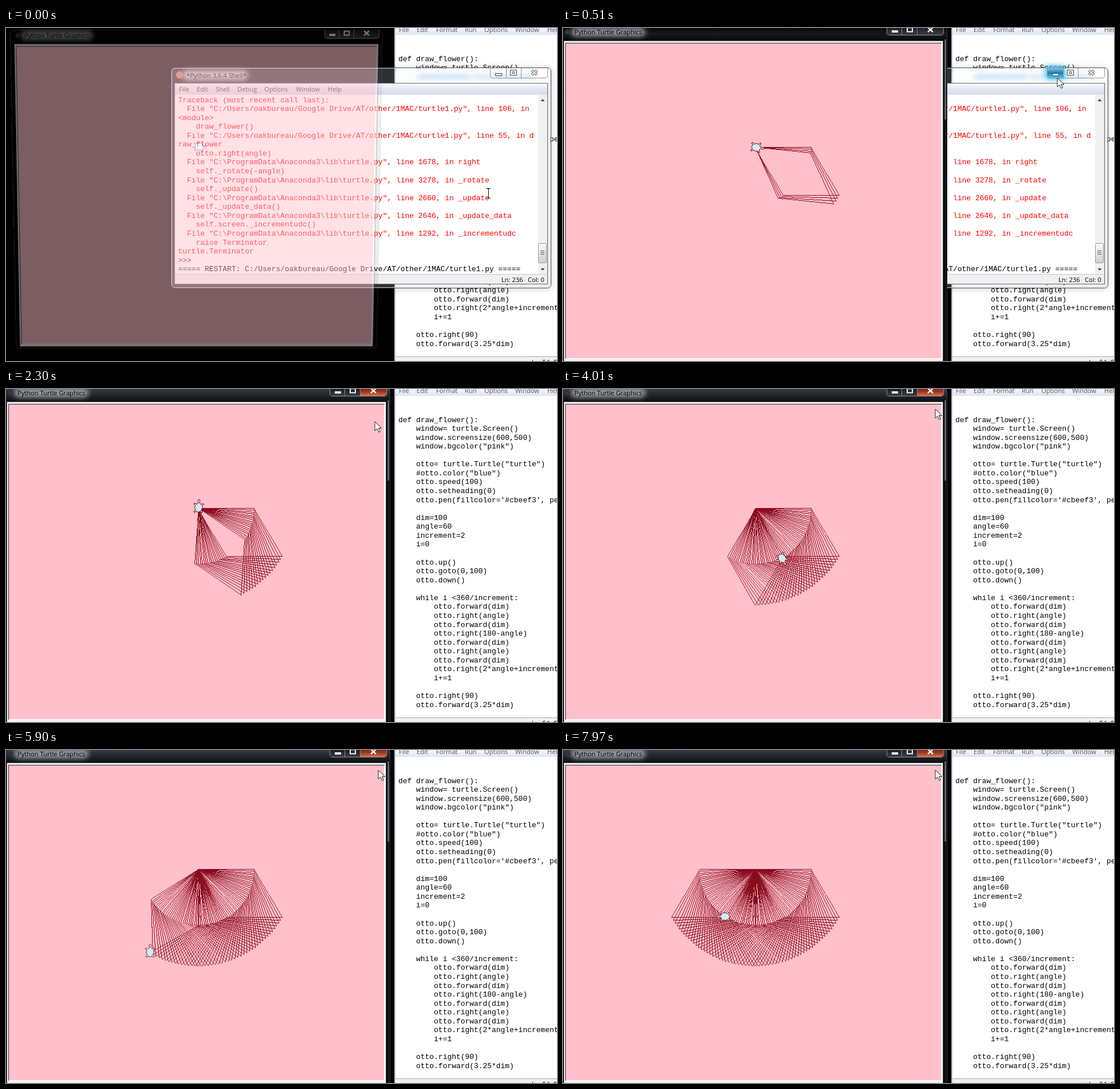
These frames come from a looping animation (962x582 px, 8000 ms). An HTML page:

```html
<!DOCTYPE html>
<html lang="en">
<head>
<meta charset="utf-8">
<title>Turtle flower</title>
<style>
html, body { margin: 0; width: 100%; height: 100%; overflow: hidden; background: #000; }
#stage { position: relative; width: 962px; height: 582px; overflow: hidden; background: #000; }
svg { position: absolute; left: 0; top: 0; width: 962px; height: 582px; overflow: visible; }
text { white-space: pre; }
.ui { font: 11.15px "Open Sans", "Noto Sans", sans-serif; }
.mono { font: 12.95px "Liberation Mono", "DejaVu Sans Mono", monospace; }
#turtleWin { transform-origin: 332px 302px; z-index: 2; }
#shellWin { transform-origin: 620px 262px; z-index: 1; }
#pointer { z-index: 5; }
.soft { filter: blur(4px); }
.shade { filter: drop-shadow(0 1px 4px rgba(0,0,0,.9)); }
.crisp { shape-rendering: crispEdges; }
</style>
</head>
<body>
<div id="stage">
  <svg id="codeWin"></svg>
  <svg id="shellWin"></svg>
  <svg id="turtleWin"></svg>
  <svg id="pointer">
    <path id="arrow" d="M0 0V16L3.8 12.5 6.8 18.5 9.3 17.4 6.4 11.5H11.7Z" fill="#fff" stroke="#222"/>
    <path id="beam" class="crisp" d="M-3.5-8.5H-1L0-7.5 1-8.5H3.5M0-8V8M-3.5 8.5H-1L0 7.5 1 8.5H3.5" fill="none" stroke="#111"/>
  </svg>
</div>
<script>
const LOOP = 8000, LINE = 15.57;
const $ = id => document.getElementById(id);
const clamp = v => Math.max(0, Math.min(1, v));
const esc = s => s.replace(/&/g, '&amp;').replace(/</g, '&lt;');
const rect = (x, y, w, h, fill, more = '') =>
  `<rect x="${x}" y="${y}" width="${w}" height="${h}" fill="${fill}" ${more}/>`;
const text = (x, y, s, cls = 'ui', fill = '#000') =>
  `<text x="${x}" y="${y}" class="${cls}" fill="${fill}">${esc(s)}</text>`;
const path = (d, stroke, more = '') => `<path d="${d}" fill="none" stroke="${stroke}" ${more}/>`;
const grad = (id, ...stops) => `<linearGradient id="${id}" x2="0" y2="1">` +
  stops.map((c, i) => `<stop offset="${i / (stops.length - 1)}" stop-color="${c}"/>`).join('') +
  '</linearGradient>';
const menu = (xs, y, fill) => ['File', 'Edit', 'Format', 'Shell', 'Debug', 'Run', 'Options', 'Window', 'Help']
  .map(s => s in xs ? text(xs[s], y, s, 'ui', fill) : '').join('');

// Editor
const code = `def draw_flower():
    window= turtle.Screen()
    window.screensize(600,500)
    window.bgcolor("pink")

    otto= turtle.Turtle("turtle")
    #otto.color("blue")
    otto.speed(100)
    otto.setheading(0)
    otto.pen(fillcolor='#cbeef3', pencolor

    dim=100
    angle=60
    increment=2
    i=0

    otto.up()
    otto.goto(0,100)
    otto.down()

    while i <360/increment:
        otto.forward(dim)
        otto.right(angle)
        otto.forward(dim)
        otto.right(180-angle)
        otto.forward(dim)
        otto.right(angle)
        otto.forward(dim)
        otto.right(2*angle+increment)
        i+=1

    otto.right(90)
    otto.forward(3.25*dim)`.split('\n');

$('codeWin').innerHTML = `<defs>${grad('bar', '#f4f6fb', '#dfe4f1')}</defs>` +
  rect(678, 0, 284, 582, '#b9bec6') + rect(680, 0, 282, 582, '#fff') + rect(680, 0, 282, 12, 'url(#bar)') +
  menu({ File: 686, Edit: 717, Format: 751, Run: 801, Options: 835, Window: 889, Help: 945 }, 7, '#555') +
  code.map((s, i) => text(685, 57.5 + i * LINE, s, 'mono')).join('') +
  rect(680, 575, 282, 7, '#f0f0f0') + rect(680, 574, 282, 1, '#aaa') + text(918, 588, 'Ln: 54  Col: 0');

// Shell
const user = 'C:/Users/oakbureau/Google Drive/AT/other/1MAC/turtle1.py';
const lib = (n, name, call) =>
  [`  File "C:\\ProgramData\\Anaconda3\\lib\\turtle.py", line ${n}, in ${name}`, `    ${call}`];
const trace = [
  'Traceback (most recent call last):',
  `  File "${user}", line 106, in `, '<module>', '    draw_flower()',
  `  File "${user}", line 55, in d`, 'raw_flower', '    otto.right(angle)',
  ...lib(1678, 'right', 'self._rotate(-angle)'),
  ...lib(3278, '_rotate', 'self._update()'),
  ...lib(2660, '_update', 'self._update_data()'),
  ...lib(2646, '_update_data', 'self.screen._incrementudc()'),
  ...lib(1292, '_incrementudc', 'raise Terminator'),
  'turtle.Terminator', '>>> ', `===== RESTART: ${user} =====`
];
const inkOf = s => s[0] === '>' ? '#770000' : s[0] === '=' ? '#000' : '#f00';

$('shellWin').innerHTML = `<defs>${grad('menuBar', '#fbfcfe', '#e3e8f4', '#d5dcec')}
  ${grad('hot', '#7fc4e8', '#1f7fb5', '#3fd0f5')}${grad('thumb', '#fafafa', '#d0d0d3')}</defs>` +
  rect(288.5, 69.5, 663, 385, 'none', 'rx="6.5" stroke="#454a50" class="shade"') +
  rect(289, 70, 662, 384, '#d3dce8', 'rx="6" fill-opacity=".22"') +
  `<g id="frost">${rect(683, 71, 266, 26, '#fdfeff', 'fill-opacity=".94"')}
    <g class="soft">${rect(720, 82, 90, 6, '#b9dcf5')}${rect(815, 82, 104, 6, '#c9e4f7')}</g></g>` +
  rect(289.5, 70.5, 661, 383, 'none', 'rx="5.5" stroke="#fff" stroke-opacity=".65"') +
  `<g class="soft">${rect(308, 74, 114, 17, '#fff', 'rx="8" fill-opacity=".7"')}</g>` +
  '<circle cx="303" cy="82" r="6.5" fill="#d2785f"/>' +
  text(315, 87, '*Python 3.6.4 Shell*') +
  `<g id="hover"><rect x="842" y="66" width="35" height="24" rx="7" fill="#45c4f5" class="soft"/></g>` +
  path('M845.5 70V83Q845.5 87.5 850 87.5H941Q945.5 87.5 945.5 83V70M873.5 70V87M899.5 70V87', '#8d949c') +
  `<path id="hotMin" d="M846 70H873V87H850Q846 87 846 83Z" fill="url(#hot)"/>` +
  rect(854.5, 79.5, 11, 4, '#fff', 'stroke="#444c55"') +
  rect(880.5, 73.5, 11, 9, '#fff', 'stroke="#444c55"') + rect(884, 76.5, 4, 3, '#fff', 'stroke="#444c55"') +
  path('M918 74L927 82M927 74L918 82', '#444c55', 'stroke-width="4"') +
  path('M918 74L927 82M927 74L918 82', '#fff', 'stroke-width="2"') +
  rect(294.5, 96.5, 651, 351, '#fff', 'stroke="#60666e"') +
  rect(295, 97, 650, 19, 'url(#menuBar)') + rect(295, 116, 650, 1, '#e8e8ee') +
  menu({ File: 302, Edit: 333, Shell: 366, Debug: 404, Options: 451, Window: 506, Help: 562 }, 111, '#333') +
  trace.map((s, i) => text(300.5, 129.5 + i * LINE, s, 'mono', inkOf(s))).join('') +
  rect(929, 117, 16, 314, '#f0f0f1') +
  '<path d="M933.5 128L937 124L940.5 128ZM933.5 420L937 424L940.5 420Z" fill="#444"/>' +
  rect(929.5, 376.5, 14, 34, 'url(#thumb)', 'rx="2" stroke="#979797"') +
  path('M933 389.5H940M933 392.5H940M933 395.5H940', '#555') +
  rect(295, 430, 650, 17, '#f0f0f0') + rect(295, 430, 650, 1, '#c8c8c8') +
  text(865, 444, 'Ln: 236') + text(911, 444, 'Col: 0');

// Turtle window
$('turtleWin').innerHTML = `<defs>${grad('dark', '#050506', '#17191c', '#08090a')}
  ${grad('lit', '#3a4046', '#24282d', '#0c0e10')}
  ${grad('btn', '#16181b', '#3a3d42')}${grad('red', '#6e2417', '#9a3520', '#d9704a')}</defs>` +
  `<g id="glass">${rect(-6, -3, 677, 589, '#000', 'rx="6"')}${rect(-5, -2, 675, 24, 'url(#dark)', 'id="titleBar"')}
    ${rect(666, 20, 3, 140, '#5d636c')}${rect(666, 160, 3, 424, '#15171b')}</g>` +
  rect(-5.5, -2.5, 676, 588, 'none', 'rx="6" stroke="#aab" stroke-opacity=".35"') +
  `<g class="soft">${rect(14, -1, 130, 16, '#c4c9cf', 'rx="8" fill-opacity=".7"')}</g>` +
  '<circle cx="8" cy="7" r="4.5" fill="#30363c"/>' + text(20, 11.3, 'Python Turtle Graphics') +
  path('M565.5 -3V9Q565.5 12.5 569 12.5H660Q664.5 12.5 664.5 9V-3', '#858a90') +
  rect(566, -3, 98, 15, 'url(#btn)') +
  `<path id="closeBtn" d="M619 -3H664V9Q664 12 660 12H619Z"/>` +
  path('M591.5 -3V12M618.5 -3V12', '#858a90') +
  rect(574, 4, 11, 4, '#f4f4f4') + rect(601, -0.5, 9, 7, 'none', 'stroke="#f4f4f4" stroke-width="2"') +
  path('M637 -1L646 7M646 -1L637 7', '#f4f4f4', 'stroke-width="2.4"') +
  `<g class="crisp">${rect(1, 22, 663, 561, '#5a5e62')}${rect(2, 23, 661, 559, '#f2f2f2')}
    ${rect(4, 26, 657, 552, '#2c2c2c')}${rect(5, 27, 656, 551, '#fff')}${rect(5, 27, 655, 550, '#ffc0cb')}</g>` +
  '<g id="trail" class="crisp" stroke="#8a0c1e"></g>' +
  '<path id="turtle" fill="#cbeef3" stroke="#8a0c1e"/>';

// Drawing program, run ahead as a list of poses: forward and turn alternate.
const STEP = 97.5, RAD = Math.PI / 180, TURNS = [60, 120, 60, 122], MOVES = 248;
const snap = v => Math.floor(v) + .5;
const poses = [{ x: 336, y: 208.5, a: 0 }];
let lines = '';
for (let k = 0; k < MOVES; k++) {
  const { x, y, a } = poses[poses.length - 1];
  const c = Math.cos(a * RAD), s = Math.sin(a * RAD), nx = x + STEP * c, ny = y + STEP * s;
  poses.push({ x: nx, y: ny, a }, { x: nx, y: ny, a: a + TURNS[k % 4] });
  // One pixel per step along the longer axis, as in an unsmoothed line.
  const w = Math.max(Math.abs(c), Math.abs(s)).toFixed(3);
  lines += `<line x1="${snap(x)}" y1="${snap(y)}" x2="${snap(nx)}" y2="${snap(ny)}" stroke-width="${w}"/>`;
}
$('trail').innerHTML = lines;
const strokes = [...$('trail').children];

// Half of the turtle outline, [side, ahead]; the other half is mirrored.
const half = [[0, 16], [2, 14], [1, 10], [4, 7], [7, 9], [9, 8], [6, 5], [7, 1], [5, -3], [8, -6], [6, -8], [4, -5], [0, -7]];
const outline = [...half, ...half.slice(1, -1).reverse().map(([s, f]) => [-s, f])];
$('turtle').setAttribute('d', 'M' + outline.map(([s, f]) => `${f} ${s}`).join('L') + 'Z');

// Keys are [time, ...values].
function track(keys, t, ease = v => v) {
  let i = 0;
  while (i < keys.length - 2 && t >= keys[i + 1][0]) i++;
  const a = keys[i], b = keys[i + 1], p = ease(clamp((t - a[0]) / (b[0] - a[0])));
  return a.slice(1).map((v, j) => v + (b[j + 1] - v) * p);
}
const smooth = v => v * v * (3 - 2 * v);
const pace = [[0, 0], [510, 32], [940, 57], [2300, 143], [4010, 249], [5900, 364], [7970, 490], [8000, 492]];
const mouse = [[0, 842, 289], [100, 842, 289], [410, 863, 87], [800, 863, 87], [900, 866, 76],
  [1350, 866, 76], [1660, 706, 62], [1860, 644, 57], [2500, 644, 57], [2760, 650, 35], [LOOP, 650, 35]];

function drawTurtle(t) {
  const n = Math.floor(track(pace, t)[0] + .2), pose = poses[n];
  strokes.forEach((el, k) => { el.style.display = 2 * k < n ? '' : 'none'; });
  $('turtle').setAttribute('transform',
    `translate(${pose.x.toFixed(1)} ${pose.y.toFixed(1)}) rotate(${pose.a % 360}) scale(.975)`);
}

function drawWindows(t) {
  const away = 1 - clamp(t / 190), tw = $('turtleWin').style;
  tw.opacity = 1 - .52 * away;
  tw.transform = away ? `translateY(${-6 * away}px) perspective(1000px) rotateX(${-3.4 * away}deg) scale(${1 - .055 * away})` : 'none';
  $('glass').style.opacity = 1 - .85 * away;
  const active = t > 800;
  $('closeBtn').setAttribute('fill', active ? 'url(#red)' : 'url(#btn)');
  $('titleBar').setAttribute('fill', active ? 'url(#lit)' : 'url(#dark)');

  const p = clamp((t - 800) / 209), sw = $('shellWin').style;
  sw.zIndex = t >= 750 ? 3 : 1;
  sw.display = p < 1 ? '' : 'none';
  sw.opacity = 1 - .87 * p;
  sw.transform = p ? `translate(${-335 * p}px,${224 * p}px) perspective(1000px) rotateY(${11 * p}deg) rotateX(${12.5 * p}deg) scale(${1 - .64 * p},${1 - .66 * p})` : 'none';
  $('frost').style.opacity = 1 - p;
  const hot = t > 390 && t < 800 ? '' : 'none';
  $('hover').style.display = $('hotMin').style.display = hot;
}

function drawPointer(t) {
  const [x, y] = track(mouse, t, smooth);
  const beam = t < 800 ? y > 117 : x > 680;
  $('beam').style.display = beam ? '' : 'none';
  $('arrow').style.display = beam ? 'none' : '';
  $(beam ? 'beam' : 'arrow').setAttribute('transform', `translate(${x.toFixed(1)} ${y.toFixed(1)})`);
}

function frame(now) {
  const t = now % LOOP;
  drawTurtle(t);
  drawWindows(t);
  drawPointer(t);
}
const start = performance.now();
(function tick() {
  frame(performance.now() - start);
  requestAnimationFrame(tick);
})();
</script>
</body>
</html>
```
